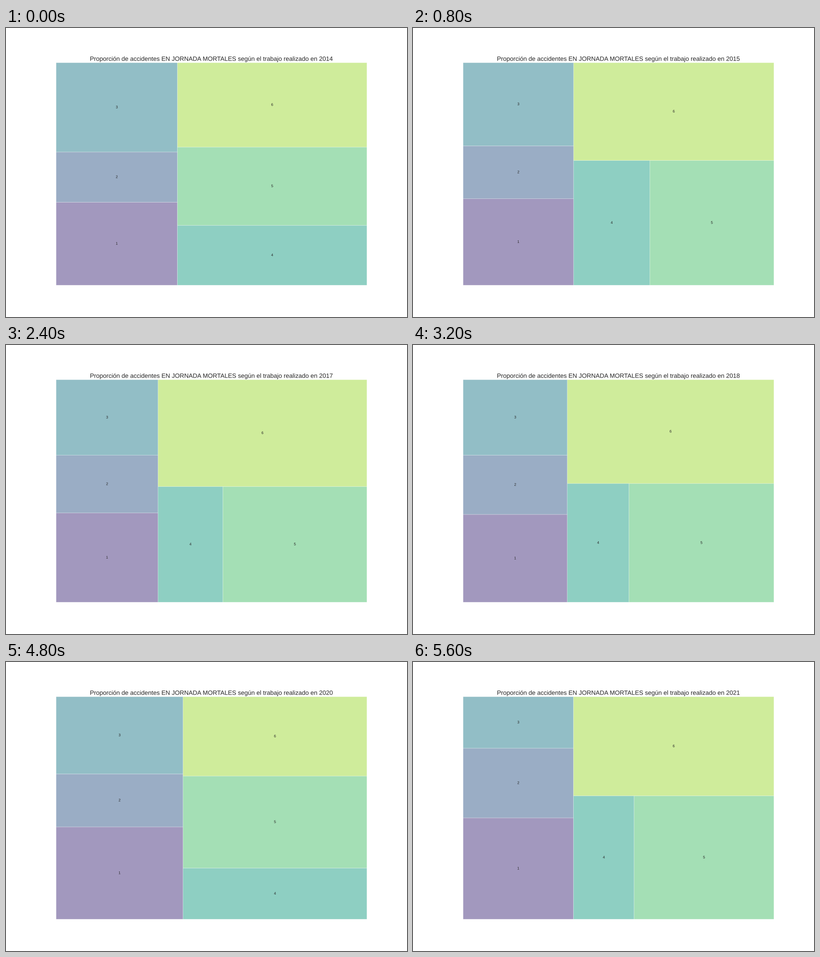
A matplotlib script for the animation above (6400 ms loop, 881x636 px).

```python
import numpy as np
import matplotlib.pyplot as plt
from matplotlib.animation import FuncAnimation
from matplotlib.patches import PathPatch, Rectangle
from matplotlib.textpath import TextPath
from matplotlib.transforms import Affine2D

WIDTH, HEIGHT, DPI = 881, 636, 64
PT = WIDTH / 1800 * 100 / 72  # pixels per point of an 18 inch wide chart
LEFT, BOTTOM = 0.125 * WIDTH, 0.11 * HEIGHT
MAP_W, MAP_H = 0.775 * WIDTH, 0.77 * HEIGHT
INK = "0.15"
COLORS = plt.cm.viridis(np.linspace(0, 1, 8)[1:-1])
TITLE = "Proporción de accidentes EN JORNADA MORTALES según el trabajo realizado en {}"

# Key years with the shares of works 1 to 5 in percent; work 6 is the rest
KEYS = {
    2014: (14.56, 8.81, 15.67, 16.41, 21.43),
    2016: (13.08, 8.08, 10.91, 11.08, 23.34),
    2018: (13.22, 8.93, 11.37, 10.59, 24.87),
    2019: (19.64, 12.87, 8.71, 10.27, 22.24),
    2020: (16.94, 9.73, 14.17, 13.60, 24.46),
    2021: (16.18, 11.11, 8.23, 10.82, 24.94),
}
FIRST, LAST = min(KEYS), max(KEYS)


def shares(year):
    first = [np.interp(year, list(KEYS), s) for s in zip(*KEYS.values())]
    return first + [100 - sum(first)]


def strip(areas, x, y, w, h):
    """Fill a column (or a row, in a tall space) and return what is left."""
    tall = w < h
    side = sum(areas) / (w if tall else h)
    rects, pos = [], x if tall else y
    for a in areas:
        size = a / side
        rects.append((pos, y, size, side) if tall else (x, pos, side, size))
        pos += size
    rest = (x, y + side, w, h - side) if tall else (x + side, y, w - side, h)
    return rects, rest


def worst_ratio(areas, space):
    rects, _ = strip(areas, *space)
    return max(max(w / h, h / w) for _, _, w, h in rects)


def squarify(areas, space):
    if not areas:
        return []
    n = 1
    while n < len(areas) and (
        worst_ratio(areas[:n], space) >= worst_ratio(areas[:n + 1], space)
    ):
        n += 1
    rects, rest = strip(areas[:n], *space)
    return rects + squarify(areas[n:], rest)


def text_path(text, size, x, baseline):
    """Outline of a text, centred on x, placed to a fraction of a pixel."""
    path = TextPath((0, 0), text, size=size, prop="Liberation Sans")
    box = path.get_extents()
    shift = Affine2D().translate(x - (box.x0 + box.x1) / 2, baseline)
    return path.transformed(shift)


fig = plt.figure(figsize=(WIDTH / DPI, HEIGHT / DPI), dpi=DPI, facecolor="white")
ax = fig.add_axes([0, 0, 1, 1])
ax.set(xlim=(0, WIDTH), ylim=(0, HEIGHT))
ax.axis("off")


def add_text():
    blank = TextPath((0, 0), "0", size=1)
    return ax.add_patch(PathPatch(blank, facecolor=INK, linewidth=0,
                                  snap=False, zorder=3))


title = add_text()
labels = [add_text() for _ in COLORS]
tiles = [
    ax.add_patch(Rectangle((0, 0), 1, 1, facecolor=color, edgecolor="white",
                           linewidth=PT * 72 / DPI, alpha=0.5, snap=False))
    for color in COLORS
]


def draw(frame):
    year = FIRST + frame
    title.set_path(text_path(TITLE.format(year), 20 * PT,
                             LEFT + MAP_W / 2, BOTTOM + MAP_H + 6 * PT))
    # The layout is chosen in unit space, then stretched to the map
    rects = squarify([s / 100 for s in shares(year)], (0, 0, 1, 1))
    size = 12 * PT
    for i, (x, y, w, h) in enumerate(rects):
        x, w = LEFT + x * MAP_W, w * MAP_W
        y, h = BOTTOM + y * MAP_H, h * MAP_H
        tiles[i].set_bounds(x, y, w, h)
        labels[i].set_path(text_path(str(i + 1), size,
                                     x + w / 2, y + h / 2 - 0.26 * size))
    return tiles + labels + [title]


anim = FuncAnimation(fig, draw, frames=LAST - FIRST + 1, interval=800,
                     repeat=True, repeat_delay=0, blit=False)
plt.show()
```
